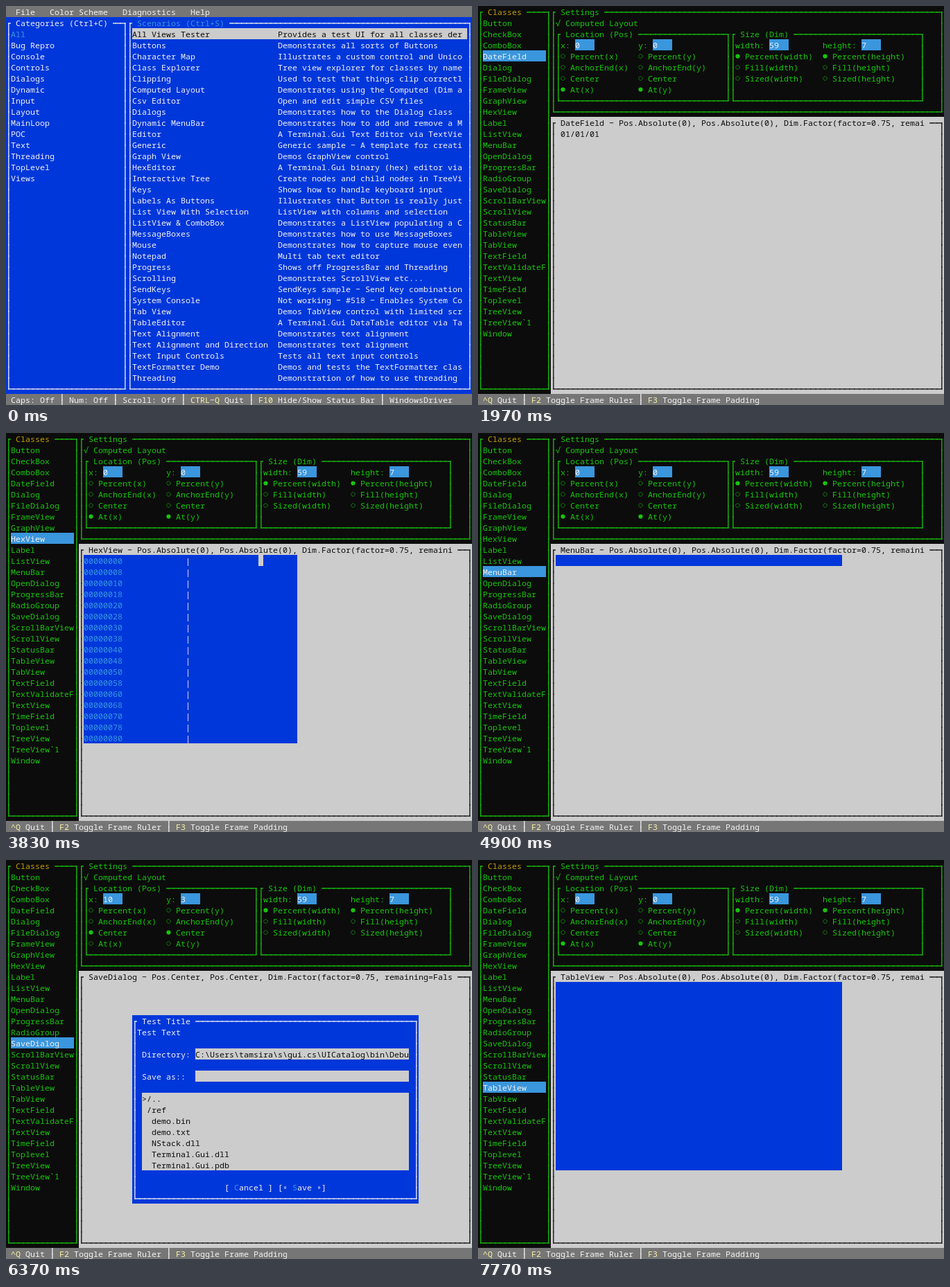
Write an HTML page with a canvas that moves like this. It is 672x576 px and loops after 8 s.

```html
<!DOCTYPE html>
<html lang="en">
<head>
<meta charset="utf-8">
<title>Terminal view tester</title>
<style>
html, body { margin: 0; width: 100%; height: 100%; overflow: hidden; background: #0c0c0c; }
canvas { display: block; }
</style>
</head>
<body>
<canvas id="screen" width="672" height="576"></canvas>
<script>
const COLS = 96, ROWS = 36, CW = 7, CH = 16, LOOP = 8000;
const BLACK = '#0c0c0c', BLUE = '#0037da', CYAN = '#3a96dd', GRAY = '#cccccc', DARK = '#767676',
      WHITE = '#f2f2f2', GREEN = '#16c60c', GOLD = '#c19c00', YELLOW = '#f9f1a5';
const ctx = document.getElementById('screen').getContext('2d');
let cells = [];

// ---- cell buffer ----
function fill(col, row, w, h, bg) {
  for (let r = row; r < row + h; r++)
    for (let c = col; c < col + w; c++) cells[r * COLS + c] = { ch: ' ', fg: bg, bg };
}

// Writes text, keeping each cell's background unless one is given.
function put(col, row, text, fg, bg) {
  [...text].forEach((ch, i) => {
    const cell = cells[row * COLS + col + i];
    cell.ch = ch;
    cell.fg = fg;
    if (bg) cell.bg = bg;
  });
}

function frame(col, row, w, h, title, fg, titleFg = fg) {
  const right = col + w - 1, bottom = row + h - 1;
  put(col, row, '┌' + '─'.repeat(w - 2) + '┐', fg);
  for (let r = row + 1; r < bottom; r++) {
    put(col, r, '│', fg);
    put(right, r, '│', fg);
  }
  put(col, bottom, '└' + '─'.repeat(w - 2) + '┘', fg);
  put(col + 1, row, ` ${title} `, titleFg);
}

function field(col, row, w, text, fg, bg) {
  fill(col, row, w, 1, bg);
  put(col, row, text, fg);
}

function statusBar(items) {
  fill(0, 35, COLS, 1, DARK);
  let col = 1;
  items.forEach(([key, label], i) => {
    if (i) { put(col, 35, ' │ ', WHITE); col += 3; }
    put(col, 35, key, YELLOW);
    put(col + key.length, 35, label, WHITE);
    col += key.length + label.length;
  });
}

// ---- rendering ----
const ARMS = { '─': 'lr', '│': 'ud', '┌': 'rd', '┐': 'ld', '└': 'ur', '┘': 'ul' };

function drawLines(arms, x, y) {
  const vx = x + 3.2, hy = y + 8.3, t = 1.3;
  if (arms.includes('l')) ctx.fillRect(x, hy, 3.2 + t, t);
  if (arms.includes('r')) ctx.fillRect(vx, hy, x + CW - vx, t);
  if (arms.includes('u')) ctx.fillRect(vx, y, t, 8.3 + t);
  if (arms.includes('d')) ctx.fillRect(vx, hy, t, y + CH - hy);
}

function drawRadio(on, x, y) {
  ctx.beginPath();
  ctx.arc(x + 3.5, y + 8.5, on ? 3.1 : 2.8, 0, Math.PI * 2);
  if (on) return ctx.fill();
  ctx.setLineDash([1.2, 1]);
  ctx.lineWidth = 1;
  ctx.stroke();
}

function drawGlyph({ ch, fg }, x, y) {
  ctx.fillStyle = ctx.strokeStyle = fg;
  if (ARMS[ch]) drawLines(ARMS[ch], x, y);
  else if (ch === '●' || ch === '◌') drawRadio(ch === '●', x, y);
  else ctx.fillText(ch === '-' ? '−' : ch, x, y + 13);
}

function render() {
  const eachCell = draw => cells.forEach((cell, i) =>
    draw(cell, i % COLS * CW, Math.floor(i / COLS) * CH));
  eachCell((cell, x, y) => {
    ctx.fillStyle = cell.bg;
    ctx.fillRect(x, y, CW, CH);
  });
  ctx.font = '11.667px "Noto Sans Mono", "DejaVu Sans Mono", monospace';
  ctx.textBaseline = 'alphabetic';
  eachCell((cell, x, y) => { if (cell.ch !== ' ') drawGlyph(cell, x, y); });
}

// ---- catalog screen ----
const CATEGORIES = 'All,Bug Repro,Console,Controls,Dialogs,Dynamic,Input,Layout,MainLoop,POC,Text,Threading,TopLevel,Views'.split(',');
const SCENARIOS = `All Views Tester|Provides a test UI for all classes der
Buttons|Demonstrates all sorts of Buttons
Character Map|Illustrates a custom control and Unico
Class Explorer|Tree view explorer for classes by name
Clipping|Used to test that things clip correctl
Computed Layout|Demonstrates using the Computed (Dim a
Csv Editor|Open and edit simple CSV files
Dialogs|Demonstrates how to the Dialog class
Dynamic MenuBar|Demonstrates how to add and remove a M
Editor|A Terminal.Gui Text Editor via TextVie
Generic|Generic sample - A template for creati
Graph View|Demos GraphView control
HexEditor|A Terminal.Gui binary (hex) editor via
Interactive Tree|Create nodes and child nodes in TreeVi
Keys|Shows how to handle keyboard input
Labels As Buttons|Illustrates that Button is really just
List View With Selection|ListView with columns and selection
ListView & ComboBox|Demonstrates a ListView populating a C
MessageBoxes|Demonstrates how to use MessageBoxes
Mouse|Demonstrates how to capture mouse even
Notepad|Multi tab text editor
Progress|Shows off ProgressBar and Threading
Scrolling|Demonstrates ScrollView etc...
SendKeys|SendKeys sample - Send key combination
System Console|Not working - #518 - Enables System Co
Tab View|Demos TabView control with limited scr
TableEditor|A Terminal.Gui DataTable editor via Ta
Text Alignment|Demonstrates text alignment
Text Alignment and Direction|Demonstrates text alignment
Text Input Controls|Tests all text input controls
TextFormatter Demo|Demos and tests the TextFormatter clas
Threading|Demonstration of how to use threading`.split('\n').map(line => line.split('|'));

function catalog() {
  fill(0, 0, COLS, ROWS, BLUE);
  fill(0, 0, COLS, 1, DARK);
  put(2, 0, 'File   Color Scheme   Diagnostics   Help', WHITE);
  frame(0, 1, 25, 34, 'Categories (Ctrl+C)', WHITE);
  frame(25, 1, 71, 34, 'Scenarios (Ctrl+S)', WHITE, CYAN);
  CATEGORIES.forEach((name, i) => put(1, 2 + i, name, i ? WHITE : CYAN));
  fill(26, 2, 69, 1, GRAY);
  SCENARIOS.forEach(([name, about], i) => {
    const fg = i ? WHITE : BLACK;
    put(26, 2 + i, name, fg);
    put(56, 2 + i, about, fg);
  });
  statusBar([['', 'Caps: Off'], ['', 'Num: Off'], ['', 'Scroll: Off'], ['CTRL-Q', ' Quit'],
             ['F10', ' Hide/Show Status Bar'], ['', 'WindowsDriver']]);
}

// ---- tester screen ----
const CLASSES = 'Button,CheckBox,ComboBox,DateField,Dialog,FileDialog,FrameView,GraphView,HexView,Label,ListView,MenuBar,OpenDialog,ProgressBar,RadioGroup,SaveDialog,ScrollBarView,ScrollView,StatusBar,TableView,TabView,TextField,TextValidateF,TextView,TimeField,Toplevel,TreeView,TreeView`1,Window'.split(',');
const LEFT = 16, TOP = 11, WIDE = 59, TALL = 17;
const block = (h = TALL, w = WIDE) => fill(LEFT, TOP, w, h, BLUE);
const row = () => block(1);

function dialog() {
  fill(26, 14, WIDE, TALL, BLUE);
  frame(26, 14, WIDE, TALL, 'Test Title', WHITE);
  put(27, 15, 'Test Text', WHITE);
}

function fileDialog(label, action) {
  dialog();
  put(28, 17, 'Directory:', WHITE);
  field(39, 17, 44, 'C:\\Users\\tamsira\\s\\gui.cs\\UICatalog\\bin\\Debu', BLACK, GRAY);
  put(28, 19, label, WHITE);
  field(39, 19, 44, '', BLACK, GRAY);
  fill(28, 21, 55, 7, GRAY);
  ['>/..', ' /ref', '  demo.bin', '  demo.txt', '  NStack.dll', '  Terminal.Gui.dll', '  Terminal.Gui.pdb']
    .forEach((name, i) => put(28, 21 + i, name, BLACK));
  const buttons = `[ Cancel ] [∘ ${action} ∘]`;
  const col = 26 + (WIDE - buttons.length) / 2;
  put(col, 29, buttons, WHITE);
  put(col + 2, 29, 'C', CYAN);
  put(col + 14, 29, action[0], CYAN);
}

const VIEWS = {
  Button() { row(); put(39, TOP, '[ Test Text ]', WHITE); put(41, TOP, 'T', CYAN); },
  CheckBox() { row(); put(LEFT, TOP, '╴ Test Text', WHITE); put(LEFT + 2, TOP, 'T', CYAN); },
  ComboBox() { put(LEFT, TOP, 'Test Text', BLACK); put(LEFT + WIDE - 1, TOP, '▼', BLACK); },
  DateField() { put(LEFT + 1, TOP, '01/01/01', BLACK); },
  Dialog: dialog,
  FileDialog() { fileDialog('File:', 'Ok'); },
  FrameView() {
    block();
    frame(LEFT, TOP, WIDE, TALL, 'Test Title', WHITE);
    put(LEFT + 1, TOP + 1, 'Test Text', WHITE);
  },
  GraphView() { block(); },
  HexView() {
    block(TALL, 44);
    for (let i = 0; i < TALL; i++) {
      put(LEFT, TOP + i, (i * 8).toString(16).padStart(8, '0'), CYAN);
      put(37, TOP + i, '|', WHITE);
    }
    fill(52, TOP, 1, 1, GRAY);
  },
  Label() { block(); put(LEFT, TOP, 'Test Text', WHITE); },
  ListView() {
    block();
    for (let i = 0; i < 3; i++) put(LEFT, TOP + i, `Test Text #${i + 1}`, i ? WHITE : CYAN);
  },
  MenuBar: row,
  OpenDialog() { fileDialog('Open:', 'Open'); },
  ProgressBar: row,
  RadioGroup() { block(); },
  SaveDialog() { fileDialog('Save as::', 'Save'); },
  ScrollBarView() {},
  ScrollView() { block(); },
  StatusBar() { fill(LEFT, 33, WIDE, 1, BLUE); },
  TableView() { block(); }
};

const POSITIONS = ['Percent', 'AnchorEnd', 'Center', 'At'];
const POS_TEXT = { 1: 'Pos.AnchorEnd(1)', 2: 'Pos.Center', 3: 'Pos.Absolute(0)' };

function radios(col, labels, selected) {
  labels.forEach((label, i) => put(col, 4 + i, `${i === selected ? '●' : '◌'} ${label}`, GREEN));
}

function settings(x, y, xMode, yMode) {
  frame(15, 0, 81, 10, 'Settings', GREEN);
  put(16, 1, '√ Computed Layout', GREEN);
  frame(16, 2, 36, 7, 'Location (Pos)', GREEN);
  frame(52, 2, 40, 7, 'Size (Dim)', GREEN);
  [[17, 'x:', x], [33, 'y:', y], [53, 'width:', 59], [71, 'height:', 7]].forEach(([col, label, value]) => {
    put(col, 3, label, GREEN);
    field(col + label.length + 1, 3, 4, String(value), WHITE, CYAN);
  });
  const posLabels = axis => POSITIONS.map(p => p === 'Center' ? p : `${p}(${axis})`);
  const dimLabels = axis => ['Percent', 'Fill', 'Sized'].map(d => `${d}(${axis})`);
  radios(17, posLabels('x'), xMode);
  radios(33, posLabels('y'), yMode);
  radios(53, dimLabels('width'), 0);
  radios(71, dimLabels('height'), 0);
}

function tester(index) {
  const name = CLASSES[index];
  const centered = name.endsWith('Dialog'), anchored = name === 'StatusBar';
  const xMode = centered ? 2 : 3, yMode = anchored ? 1 : xMode;

  fill(0, 0, COLS, ROWS, BLACK);
  frame(0, 0, 15, 35, 'Classes', GREEN, GOLD);
  CLASSES.forEach((label, i) => put(1, 1 + i, label, GREEN));
  field(1, 1 + index, 13, name, WHITE, CYAN);
  settings(centered ? 10 : 0, centered ? 3 : anchored ? 22 : 0, xMode, yMode);

  fill(15, 10, 81, 25, GRAY);
  const title = `${name} - ${POS_TEXT[xMode]}, ${POS_TEXT[yMode]}, Dim.Factor(factor=0.75, remaining=False)`;
  frame(15, 10, 81, 25, title.slice(0, 75), BLACK);
  VIEWS[name]();
  statusBar([['^Q', ' Quit'], ['F2', ' Toggle Frame Ruler'], ['F3', ' Toggle Frame Padding']]);
}

// ---- timeline: catalog, cleared screen, then one class per step ----
const STARTS = [0, 500, 570, 1230, 1570, 1970, 2300, 2700, 3100, 3430, 3830, 4170, 4570,
                4900, 5230, 5630, 5970, 6370, 6700, 7030, 7370, 7770];
let shown = -1;

function tick() {
  const time = performance.now() % LOOP;
  const step = STARTS.filter(start => start <= time).length - 1;
  if (step !== shown) {
    shown = step;
    if (step === 0) catalog();
    else if (step === 1) fill(0, 0, COLS, ROWS, BLACK);
    else tester(step - 2);
    render();
  }
  requestAnimationFrame(tick);
}
tick();
</script>
</body>
</html>
```
